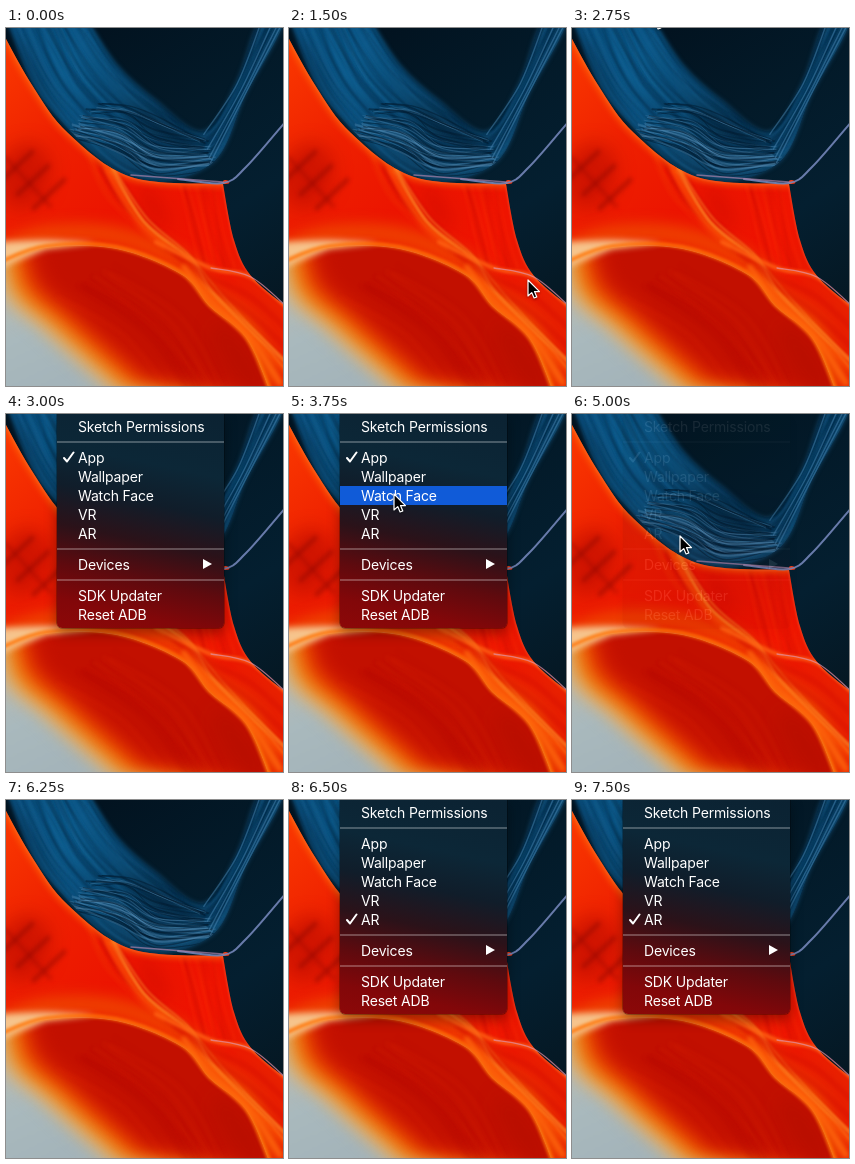
An HTML page with a canvas for the animation above (8 s loop, 277x358 px).

```html
<!DOCTYPE html>
<html lang="en">
<head>
<meta charset="utf-8">
<title>Sketch menu</title>
<style>
  html, body { margin: 0; width: 100%; height: 100%; overflow: hidden; background: #04192a; }
  canvas, .menu, .cursor { position: absolute; left: 0; top: 0; }
  canvas { width: 277px; height: 358px; }

  .menu {
    left: 51px; width: 167px; height: 214px; padding-top: 3px; box-sizing: border-box;
    border-radius: 0 0 5px 5px;
    background: linear-gradient(192deg, #0b2232, #0c2737 26%, #101d2a 42%, #2b1219 58%, #5f0a0e 74%, #820709 88%, #8c0808);
    box-shadow: 0 0 0 .5px rgba(0,0,0,.5), 0 5px 13px rgba(0,0,0,.38);
    color: #fff; font: 14px/19px Inter, "Open Sans", sans-serif; letter-spacing: -.17px;
    animation: menu 8s step-end infinite;
  }
  .menu p { position: relative; margin: 0; padding-left: 21px; height: 19px; white-space: nowrap; }
  .menu hr { margin: 5px 0; height: 2px; border: 0; background: rgba(255,255,255,.25); }
  .menu svg { position: absolute; overflow: visible; }
  .bar { position: absolute; top: 72px; width: 100%; height: 19px; background: #105bd8; animation: bar 8s step-end infinite; }
  .check { left: 6px; top: 37px; fill: none; stroke: #fff; stroke-width: 2; stroke-linecap: round; stroke-linejoin: round; animation: check 8s step-end infinite; }
  .arrow { left: 146px; top: 145px; fill: #fff; }

  .cursor {
    overflow: visible; stroke: #fff; stroke-width: 1.2; stroke-linejoin: round;
    filter: drop-shadow(0 1px 1px rgba(0,0,0,.4));
    animation: cursor 8s step-end infinite;
  }

  @keyframes menu {
    0%, 65.625% { opacity: 0; }
    37.5%, 81.25%, 100% { opacity: 1; }
    62.5% { opacity: .09; }
  }
  /* One row is 19px */
  @keyframes bar {
    0% { opacity: 0; }
    46.875% { opacity: 1; }
    50% { translate: 0 19px; }
    53.125% { translate: 0 38px; }
    46.875%, 50%, 53.125% { opacity: 1; }
    59.375%, 100% { opacity: 0; }
  }
  @keyframes check {
    0% { translate: 0; }
    70%, 100% { translate: 0 76px; }
  }
  @keyframes cursor {
    0%, 37.5%, 78.125%, 100% { translate: 80px -40px; }
    18.75% { translate: 239px 252px; }
    21.875% { translate: 214px 247px; }
    25% { translate: 109px 68px; }
    28.125% { translate: 96px 38px; }
    31.25% { translate: 81px -13px; }
    34.375% { translate: 80px -17px; }
    43.75% { translate: 87px 10px; }
    46.875% { translate: 105px 80px; }
    50% { translate: 106px 111px; }
    53.125% { translate: 107px 121px; }
    56.25% { translate: 108px 122px; }
    71.875% { translate: 109px 108px; }
    75% { translate: 89px -17px; }
  }
</style>
</head>
<body>
<canvas width="277" height="358"></canvas>

<div class="menu">
  <div class="bar"></div>
  <p>Sketch Permissions</p>
  <hr>
  <p>App</p>
  <p>Wallpaper</p>
  <p>Watch Face</p>
  <p>VR</p>
  <p>AR</p>
  <hr>
  <p>Devices</p>
  <hr>
  <p>SDK Updater</p>
  <p>Reset ADB</p>
  <svg class="check" width="12" height="12"><path d="M1 7 4 10.5 10.5 1.5"/></svg>
  <svg class="arrow" width="9" height="10"><path d="M0 0 9 5 0 10Z"/></svg>
</div>

<svg class="cursor" width="12" height="19"><path d="M0 0V16L3.7 12.6 6.1 18 8.8 16.9 6.5 11.6H11.5Z"/></svg>

<script>
  const ctx = document.querySelector('canvas').getContext('2d');
  ctx.lineCap = 'round';

  let seed = 11;
  const rand = () => (seed = seed * 16807 % 2147483647) / 2147483647;
  const mix = (a, b, t) => a.map((v, k) => v + (b[k] - v) * t);
  const shift = (p, dx, dy) => p.map((v, k) => v + (k % 2 ? dy : dx));

  // Smooth path through flat x,y points, then straight through the corners.
  function spline(p, corners = []) {
    const path = new Path2D(), n = p.length / 2;
    const at = (i, k) => p[2 * Math.max(0, Math.min(n - 1, i)) + k];
    path.moveTo(p[0], p[1]);
    for (let i = 0; i < n - 1; i++) {
      const lead = k => at(i, k) + (at(i + 1, k) - at(i - 1, k)) / 6;
      const trail = k => at(i + 1, k) - (at(i + 2, k) - at(i, k)) / 6;
      path.bezierCurveTo(lead(0), lead(1), trail(0), trail(1), at(i + 1, 0), at(i + 1, 1));
    }
    for (let i = 0; i < corners.length; i += 2) path.lineTo(corners[i], corners[i + 1]);
    return path;
  }
  function soft(blur, draw) {
    ctx.filter = blur ? `blur(${blur}px)` : 'none';
    draw();
    ctx.filter = 'none';
  }
  function fill(path, style, blur) {
    ctx.fillStyle = style;
    soft(blur, () => ctx.fill(path));
  }
  function line(points, color, width, blur) {
    ctx.strokeStyle = color;
    ctx.lineWidth = width;
    soft(blur, () => ctx.stroke(spline(points)));
  }
  function blob(x, y, rx, ry, turn, color) {
    const path = new Path2D();
    path.ellipse(x, y, rx, ry, turn, 0, 7);
    fill(path, color, 9);
  }
  function ramp(x0, y0, x1, y1, ...colors) {
    const g = ctx.createLinearGradient(x0, y0, x1, y1);
    colors.forEach((c, i) => g.addColorStop(i / (colors.length - 1), c));
    return g;
  }
  // Thin lines spread between two guide curves.
  function strands(a, b, count, wobble, blur, colors) {
    for (let i = 0; i < count; i++) {
      const pts = mix(a, b, rand()).map(v => v + (rand() - .5) * wobble);
      line(pts, colors[i % colors.length], .6 + rand() * 1.4, blur);
    }
  }
  function inside(path, draw) {
    ctx.save();
    ctx.clip(path);
    draw();
    ctx.restore();
  }

  // Key curves of the landscape
  const outer = [2, -4, 40, 75, 125, 150, 205, 136, 240, 66, 277, -4];
  const inner = [84, -4, 112, 38, 150, 72, 197, 103, 230, 55, 252, -4];
  const ridge = [-6, 0, 26, 57, 62, 105, 125, 149, 217, 156];
  const side = [217, 156, 228, 212, 245, 248, 282, 280];
  const rim = [-6, 236, 40, 220, 110, 221, 176, 247, 204, 279, 240, 310, 264, 364];
  const spine = [102, 142, 135, 195, 180, 232, 204, 266, 246, 308, 284, 346];
  const seam = [150, 214, 205, 240, 245, 249, 282, 280];
  const shore = [-8, 190, -6, 262, 36, 304, 104, 364];

  // Night and blue cloth
  ctx.fillStyle = ramp(100, 0, 277, 280, '#021320', '#031a29', '#041f30', '#051722');
  ctx.fillRect(0, 0, 277, 358);

  const back = inner.map((v, k) => inner[inner.length - 2 - k + 2 * (k % 2)]);
  const cloth = spline([...outer, ...back]);
  fill(cloth, ramp(20, 0, 210, 130, '#0b5180', '#0d5888', '#0c4b74', '#0c3a5a', '#10466a'), 2);
  inside(cloth, () => {
    blob(60, 32, 12, 45, -.5, 'rgba(16,104,156,.5)');
    blob(155, 98, 38, 10, .5, 'rgba(3,24,42,.5)');
    blob(30, 50, 8, 45, -.5, 'rgba(4,34,58,.5)');
    strands(outer, inner, 60, 8, 1, ['rgba(40,116,164,.22)', 'rgba(3,32,56,.32)']);
    strands([62, 108, 110, 122, 150, 145, 208, 138], [92, 76, 122, 76, 152, 90, 196, 108], 44, 9, .5,
      ['rgba(84,142,184,.36)', 'rgba(3,26,46,.5)']);
  });
  for (const t of [.05, .2, .45, .9]) line(mix(outer, inner, t).slice(6), 'rgba(70,132,176,.5)', 1.4, .6);

  // Red dune
  const edge = [...ridge, ...side];
  const dune = spline(edge, [282, 364, -6, 364]);
  fill(dune, ramp(0, 40, 240, 300, '#f83400', '#ee2000', '#ec1500', '#ee1400', '#e82000'), .5);
  inside(dune, () => {
    blob(18, 148, 26, 34, .3, 'rgba(185,12,0,.55)');
    blob(148, 180, 8, 26, -.5, 'rgba(205,10,0,.6)');
    blob(206, 205, 5, 40, -.15, 'rgba(255,30,0,.7)');
    for (let i = 0; i < 3; i++) line(shift([-4, 152, 26, 124], i * 16, i * 14), 'rgba(140,8,0,.45)', 5, 2);
    line([0, 130, 44, 178], 'rgba(150,8,0,.35)', 4, 2);
    strands([70, 112, 100, 165, 165, 222], [118, 146, 142, 190, 190, 234], 14, 8, 1.5,
      ['rgba(255,90,0,.28)', 'rgba(190,8,0,.35)']);
    strands([172, 158, 184, 198, 192, 236], [217, 158, 226, 205, 236, 242], 12, 4, 1.5,
      ['rgba(255,50,10,.4)', 'rgba(185,8,0,.4)']);
    line(ridge, 'rgba(255,110,10,.85)', 5, 3);
    line(edge, 'rgba(255,130,70,.6)', 1.4, .8);
    line(shift(rim, 0, -13), 'rgba(240,95,0,.6)', 18, 7);
  });

  // Bowl: pale ground under warm layers that fade towards the right
  const bowl = spline(rim, [-6, 364]);
  fill(bowl, ramp(0, 250, 50, 358, '#b9bcb4', '#a9b9bd', '#a4b4ba'), 1);
  inside(bowl, () => {
    ['#d8b27a', '#f08414', '#e84400', '#d01a00', '#c21000'].forEach((color, i) =>
      fill(spline(shift(shore, i * 11, -i * 5), [330, 380, 330, 150]), color, 8));
    blob(235, 335, 14, 46, -.6, 'rgba(180,14,0,.6)');
    strands([50, 270, 110, 310, 160, 364], [110, 240, 185, 290, 225, 364], 12, 10, 2,
      ['rgba(236,48,0,.3)', 'rgba(170,8,0,.3)']);
  });

  // Glowing folds
  inside(dune, () => {
    fill(spline([-6, 214, 40, 212, 90, 215], [40, 221, -6, 240]), '#f6c48c', 3);
    line(shift(rim, 0, -2), 'rgba(255,118,8,.85)', 4, 1.5);
    line(spine, 'rgba(255,92,8,.75)', 6, 2.5);
    strands(spine, shift(spine, 5, -4), 4, 5, .8, ['rgba(255,140,40,.6)']);
    for (const t of [.35, .65]) line(mix(spine.slice(4), seam, t), 'rgba(215,16,0,.55)', 5, 2);
    line(mix(rim.slice(6), spine.slice(4), .5), 'rgba(255,104,14,.8)', 6, 2);
    line(seam, 'rgba(255,100,20,.8)', 4, 1.8);
  });
  line(seam.slice(2), 'rgba(226,140,160,.75)', 1.3, .5);

  // Pale thread along the cloth
  line([280, 93, 240, 139, 217, 155, 172, 151], 'rgba(116,134,184,.9)', 2, .6);
  line(shift(ridge.slice(6), 0, -2), 'rgba(170,130,168,.7)', 1.5, .6);
</script>
</body>
</html>
```
